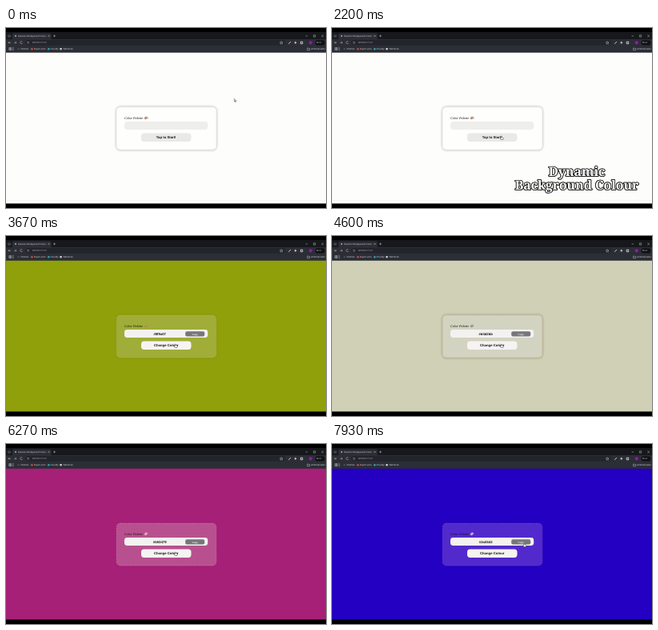
Recreate the animation shown at these times as an HTML page. Size 400x225 px, loop 8 s.

```html
<!DOCTYPE html>
<html lang="en">
<head>
<meta charset="utf-8">
<title>Dynamic Background Colour</title>
<style>
  html, body { margin: 0; width: 100%; height: 100%; overflow: hidden; background: #000; }
  svg { display: block; width: 100%; height: 100%; }
  text { font-family: "Liberation Sans", Arial, sans-serif; text-rendering: geometricPrecision; }
  .ui { font: 2.75px Roboto, sans-serif; fill: #d4d5d9; }
  .bold { font-size: 4.25px; font-weight: 700; text-anchor: middle; }
  .label { font: italic 4.25px "Liberation Serif", serif; }
  .line { fill: none; stroke: #c6c7cc; stroke-width: .5; }
  .title { filter: drop-shadow(.5px .6px 0 #151515); }
  .title text {
    font: 700 15.8px "Noto Serif", serif; text-anchor: middle;
    fill: #fff; stroke: #151515; stroke-width: 1.6; paint-order: stroke; stroke-linejoin: round;
  }
</style>
</head>
<body>
<svg viewBox="0 0 400 225">
  <defs>
    <filter id="soft" x="-20%" y="-30%" width="140%" height="160%"><feGaussianBlur stdDeviation="1.1"/></filter>
  </defs>
  <rect width="400" height="225"/>

  <g id="chrome">
    <rect y="5" width="400" height="9.5" fill="#17181c"/>
    <path d="M8 14.5V8.2q0-1.7 1.7-1.7H55q1.7 0 1.7 1.7v6.3z" fill="#2c2e36"/>
    <rect y="14" width="400" height="17" fill="#2c2e36"/>
    <rect x="24" y="15" width="325" height="6.6" rx="3.3" fill="#23252c"/>
    <rect x="1.5" y="7.6" width="5" height="5" rx="1.5" fill="#2c2e36"/>
    <path class="line" d="M3 9.6l1 1 1-1M52.6 9l1.8 1.8m0-1.8l-1.8 1.8M59 9.9h3m-1.5-1.5v3
      M374.5 10h2.6M384.4 8.8h2.3v2.3h-2.3zM394.4 8.8l2.4 2.4m0-2.4l-2.4 2.4
      M6 18.3H3m1.3-1.3L3 18.3l1.3 1.3M10 18.3h3m-1.3-1.3l1.3 1.3-1.3 1.3
      M20.3 17.2a1.5 1.5 0 1 0 .3 1.6M26.4 17.5h2.4m-2.4 1.6h2.4
      M344.2 16.6l.6 1.2 1.3.1-1 .9.3 1.3-1.2-.7-1.2.7.3-1.3-1-.9 1.3-.1z
      M3.8 24.6h3v3h-3zM5.3 24.6v3M3.8 26.1h3M9 23.7v4.8
      M376.6 25h1.2l.5.5h1.4v2.2h-3.1z"/>
    <path class="line" style="stroke:#eee;stroke-width:.8" d="M353.2 19.8l2.8-2.8M361.8 16.8v3m-1.3-1.5h2.6M368.3 17.2h2.4v2.5h-2.4z"/>
    <circle cx="12" cy="10" r="1.1" fill="#a5a8b0"/>
    <text class="ui" x="15" y="10.9">Dynamic Background Colour</text>
    <text class="ui" x="32.5" y="19.3">127.0.0.1<tspan fill="#858890">:5500</tspan></text>
    <circle cx="380.7" cy="18.3" r="2" fill="#a012b5"/>
    <rect x="386.5" y="15.2" width="12" height="6.3" rx="3.1" fill="#101115"/>
    <text class="ui" x="388" y="19.3">Error :</text>
    <circle cx="15.5" cy="26.2" r="1.1" fill="#50535b"/>
    <text class="ui" x="18.3" y="27.1">Chatmio</text>
    <circle cx="32.4" cy="26.2" r="1.3" fill="#d9473f"/>
    <text class="ui" x="34.8" y="27.1">Super Lento</text>
    <circle cx="53.3" cy="26.2" r="1.3" fill="#28a5bd"/>
    <text class="ui" x="55.6" y="27.1">Cloudby</text>
    <rect x="67.4" y="25" width="2.3" height="2.3" fill="#d5d6da"/>
    <text class="ui" x="71.4" y="27.1">Web Book</text>
    <text class="ui" x="381.2" y="27.1">All Bookmarks</text>
  </g>

  <rect id="page" y="30.8" width="400" height="188.6"/>
  <rect id="edge" y="215" width="400" height="1" fill="#f4f4ee"/>

  <rect id="shadow" x="136.8" y="97.4" width="127.4" height="56.2" rx="6.5" filter="url(#soft)"/>
  <rect id="card" x="138.2" y="99.1" width="124.6" height="52.8" rx="4.5"/>
  <text class="label" x="148" y="114" fill="#15130f">Color Palette</text>
  <g id="emoji">
    <ellipse cx="174.9" cy="112.4" rx="2.2" ry="1.6" transform="rotate(-30 174.9 112.4)"/>
    <circle cx="174" cy="112.4" r=".45" fill="#e7b43a"/>
    <circle cx="175.3" cy="111.5" r=".45" fill="#f6f0e8"/>
    <circle cx="175.7" cy="112.8" r=".4" fill="#4a76b8"/>
  </g>
  <text id="colon" class="label" x="177.1" y="114">:</text>
  <rect id="field" x="148" y="117" width="104.2" height="10" rx="3.4"/>
  <text id="code" class="bold" x="192.2" y="123.5" fill="#161616"></text>
  <g id="copy">
    <rect x="224.2" y="119.2" width="24" height="6.4" rx="2" fill="#77767a"/>
    <text class="bold" x="236.2" y="123.6" fill="#f1f1f1" style="font-size:2.9px">Copy</text>
  </g>
  <rect id="button" x="169" y="131.4" width="62.5" height="10.5" rx="3.6"/>
  <text id="action" class="bold" x="200.2" y="138.2" fill="#111"></text>

  <g id="title" class="title">
    <text x="306" y="185">Dynamic</text>
    <text x="306" y="202.2">Background Colour</text>
  </g>

  <g id="cursor" stroke="#222" stroke-width=".45" stroke-linejoin="round" fill="#fff">
    <path id="arrow" d="M0 0v3.5l.9-.8.6 1.4.6-.3-.6-1.3h1.1z"/>
    <path id="hand" d="M-.5 .2q.5-.6 1 0V1.6l1.6.4q.4.1.3.6l-.3 1.7H-.7L-1.7 2.5q.3-.6 1.2 0z"/>
  </g>
</svg>
<script>
const LOOP = 8000;
const el = id => document.getElementById(id);
const set = (id, attrs) => { for (const k in attrs) el(id).setAttribute(k, attrs[k]); };
const clamp = v => Math.min(1, Math.max(0, v));
const span = (t, a, b) => clamp((t - a) / (b - a));
const ease = p => p * p * (3 - 2 * p);
const lerp = (a, b, p) => a + (b - a) * p;

// Each click shows the next colour.
const states = [
  { at: 0, page: '#fdfdfb', card: '#fefefd', border: '#f0f0ef', emoji: '#b98a70', shade: .17 },
  { at: 2400, code: '#ae1191', page: '#9b0089', card: '#ae30a0', border: '#b850ae', emoji: '#eb9bb0', shade: .02 },
  { at: 3560, code: '#8f9a07', page: '#8fa00b', card: '#a0ad38', border: '#adb65c', emoji: '#b08b45', shade: .03 },
  { at: 4480, code: '#d4d2bb', page: '#cfd0b6', card: '#d3d3c1', border: '#d4b682', emoji: '#96948a', shade: .14 },
  { at: 5540, code: '#b53479', page: '#a72078', card: '#b8508f', border: '#cd83ad', emoji: '#efa4b4', shade: .02 },
  { at: 6880, code: '#2a03d2', page: '#2400c2', card: '#5229cc', border: '#7150cf', emoji: '#c9a5dc', shade: .03 }
];

function drawPage(s) {
  const live = Boolean(s.code);
  const show = on => on ? 'inline' : 'none';
  set('page', { fill: s.page });
  set('edge', { display: show(!live) });
  set('shadow', { opacity: s.shade });
  set('card', { fill: s.card, stroke: s.border, 'stroke-width': .6, 'stroke-dasharray': live ? '2 1.2' : 'none' });
  set('emoji', { fill: s.emoji });
  set('colon', { display: show(!live) });
  set('field', { fill: live ? '#f3f2f1' : '#eeeeed' });
  set('button', { fill: live ? '#f5f4f2' : '#e9e9e8' });
  set('copy', { display: show(live) });
  el('code').textContent = s.code || '';
  el('action').textContent = live ? 'Change Colour' : 'Tap to Start!';
}

function drawCursor(t) {
  const go = ease(span(t, 500, 1700));
  const leave = ease(span(t, 7100, 7600));
  const x = lerp(lerp(285.3, 211.8, go), 240.4, leave);
  const y = lerp(lerp(88.5, 135.2, go), 124.3, leave);
  const inside = (l, r, top, bottom) => x > l && x < r && y > top && y < bottom;
  const hand = inside(169, 231.5, 131.4, 141.9) || inside(224.2, 248.2, 119.2, 125.6);
  set('cursor', { transform: `translate(${x} ${y})` });
  set('arrow', { display: hand ? 'none' : 'inline' });
  set('hand', { display: hand ? 'inline' : 'none' });
}

function draw(t) {
  drawPage(states.filter(s => s.at <= t).pop());
  drawCursor(t);
  set('title', { opacity: ease(span(t, 350, 850)) * (1 - span(t, 2400, 2800)) });
}

const start = performance.now();
function tick() {
  draw((performance.now() - start) % LOOP);
  requestAnimationFrame(tick);
}
tick();
</script>
</body>
</html>
```
